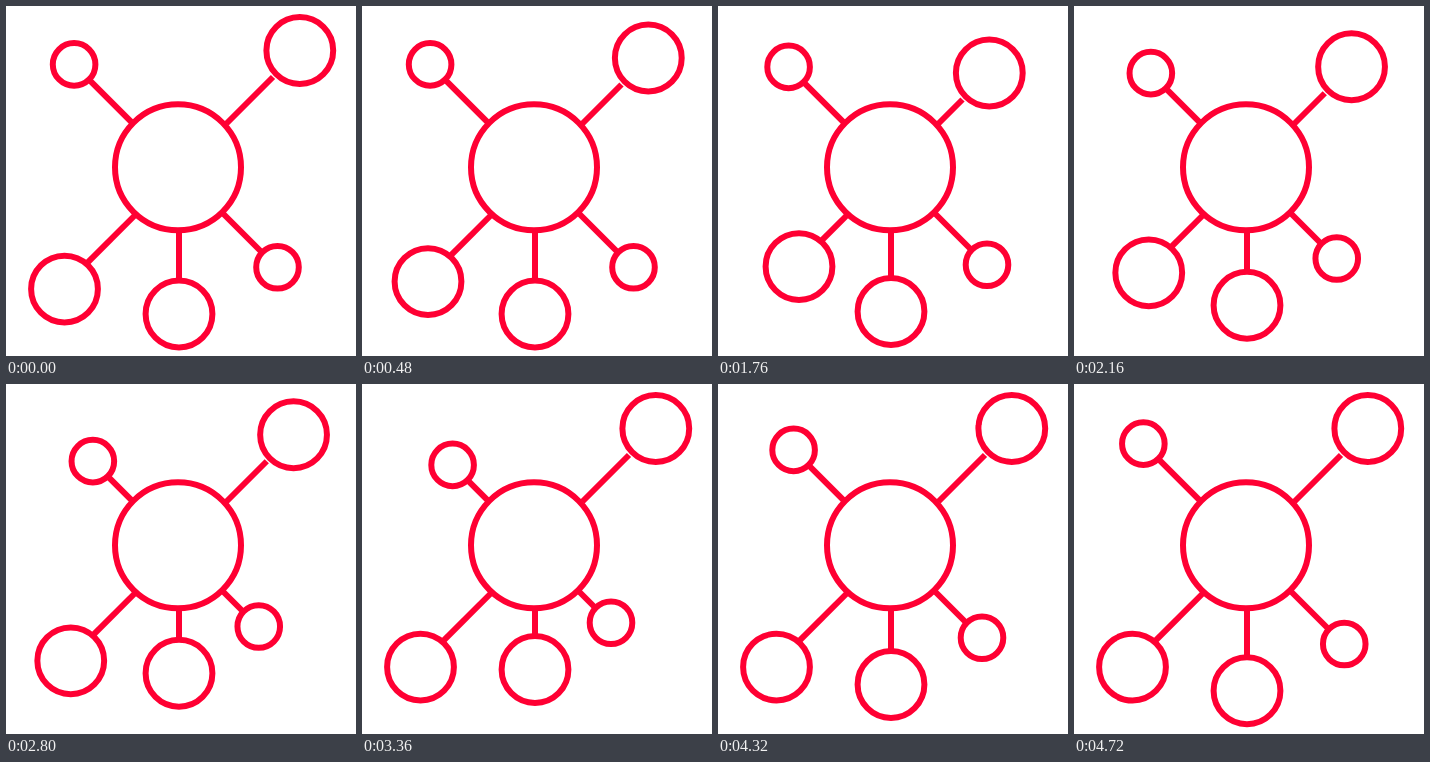
Recreate the animation shown at these times as an HTML page. Size 350 px wide and 350 px high, loop 4800 ms.

```html
<!DOCTYPE html>
<html lang="en">
<head>
<meta charset="utf-8">
<title>Hub and nodes</title>
<style>
  html, body { margin: 0; width: 100%; height: 100%; overflow: hidden; background: #fff; }
  svg { display: block; width: 100vw; height: 100vh; }
  circle, line { fill: #fff; stroke: #ff0033; stroke-width: 6; }
</style>
</head>
<body>
<svg viewBox="0 0 350 350">
  <g id="nodes"></g>
  <circle cx="172" cy="161.3" r="63"/>
</svg>
<script>
const LOOP = 4800, STEP = 80, RAMP = 1600, REACH = 25;

// x, y, r: circle; dx, dy: direction to the hub; delay: start of the move; line: outer end, hub end
const nodes = [
  { x: 293.8, y: 44.5, r: 33.4, dx: -1, dy: 1, delay: 0, line: [267, 71, 220.5, 117.5] },
  { x: 58.5, y: 283.1, r: 33.4, dx: 1, dy: -1, delay: 0, line: [79.5, 258.7, 129.2, 209] },
  { x: 68.1, y: 58.4, r: 21.3, dx: 1, dy: 1, delay: RAMP, line: [83, 73.6, 126.5, 117.1] },
  { x: 271.5, y: 261.2, r: 21.3, dx: -1, dy: -1, delay: RAMP, line: [255.5, 246, 217, 207.5] },
  { x: 173, y: 308, r: 33.4, dx: 0, dy: -1, delay: RAMP, line: [173, 273, 173, 224.5] }
];

function add(parent, tag, attrs) {
  const el = document.createElementNS("http://www.w3.org/2000/svg", tag);
  for (const key in attrs) el.setAttribute(key, attrs[key]);
  return parent.appendChild(el);
}

const root = document.getElementById("nodes");
for (const n of nodes) {
  const [x1, y1, x2, y2] = n.line;
  n.el = add(root, "g", {});
  add(n.el, "line", { x1, y1, x2, y2 });
  add(n.el, "circle", { cx: n.x, cy: n.y, r: n.r });
}

// Linear in and out: peaks one ramp after the delay
const shift = (t, delay) => REACH * Math.max(0, 1 - Math.abs(t - delay - RAMP) / RAMP);

function draw(now) {
  const t = Math.floor((now % LOOP) / STEP) * STEP;
  for (const n of nodes) {
    const d = shift(t, n.delay);
    n.el.setAttribute("transform", `translate(${n.dx * d} ${n.dy * d})`);
  }
}

function tick() {
  draw(performance.now());
  requestAnimationFrame(tick);
}
draw(0);
requestAnimationFrame(tick);
</script>
</body>
</html>
```
